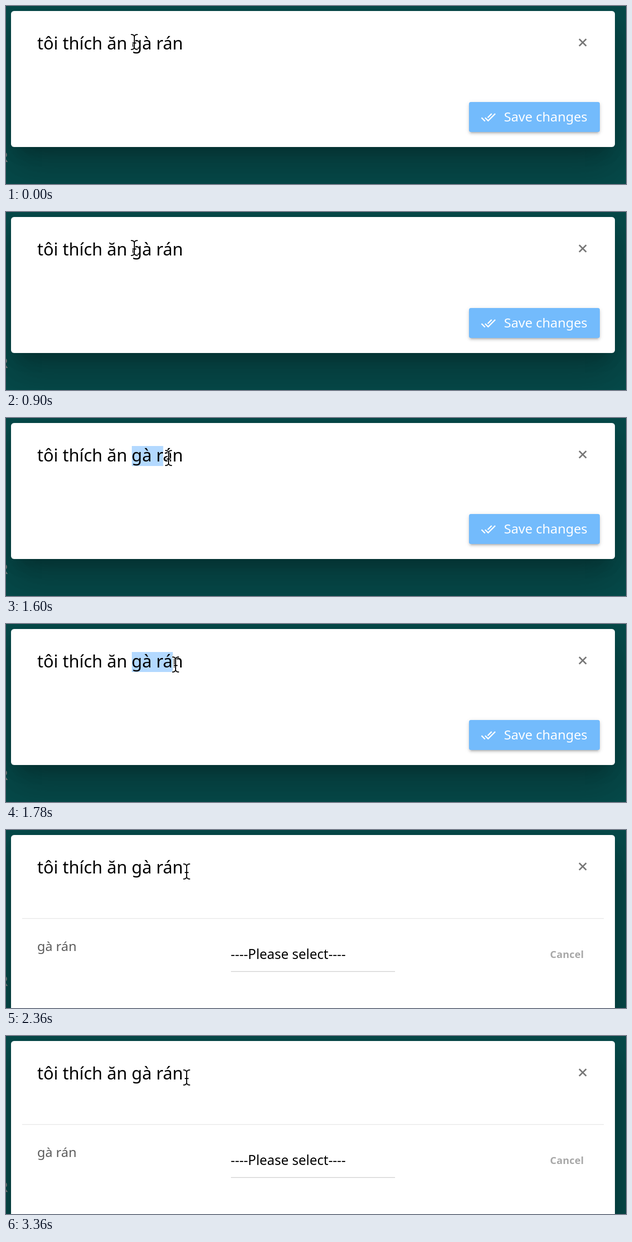
Animation of 1232 by 356 pixels, one loop 3380 ms. Source, as an HTML page:

```html
<!DOCTYPE html>
<html lang="vi">
<head>
<meta charset="utf-8">
<title>Select a phrase</title>
<style>
  html, body { margin: 0; width: 100%; height: 100%; overflow: hidden; background: #074b4b; }
  svg { position: absolute; left: 0; top: 0; display: block; }
  text { font-family: "Noto Sans", sans-serif; font-size: 26px; white-space: pre; }
  #card, #button { position: absolute; box-sizing: border-box; }
  #card {
    left: 10px; top: 10px; width: 1200px; height: 272px;
    border-radius: 6px; background: #fff;
    box-shadow: 0 22px 30px -14px rgba(0,0,0,.2), 0 48px 76px 6px rgba(0,0,0,.14), 0 18px 92px 16px rgba(0,0,0,.12);
  }
  #button {
    left: 910px; top: 182px; width: 260px; height: 60px;
    border-radius: 4px; background: #73bbfc;
    box-shadow: 0 6px 2px -4px rgba(0,0,0,.12), 0 4px 4px rgba(0,0,0,.1), 0 2px 10px rgba(0,0,0,.12);
  }
</style>
</head>
<body>
<svg width="1232" height="356">
  <text x="4" y="312" text-anchor="end" style="font-size:28px" fill="#7c8080">R</text>
</svg>
<div id="card"><div id="button"></div></div>
<svg width="1232" height="356" viewBox="0 0 1232 356">
  <rect id="mark" x="250" y="56" width="0" height="40" fill="#b3d9ff"/>
  <text x="62" y="87" style="font-size:34px">tôi thích ăn gà rán</text>
  <path d="M1139 66l14 14m0-14l-14 14" stroke="#777" stroke-width="3"/>

  <g id="save" fill="#fff">
    <path transform="translate(943.5 207.6) scale(1.25)" d="M18 7l-1.41-1.41-6.34 6.34 1.41 1.41L18 7zm4.24-1.41L11.66 16.17 7.48 12l-1.41 1.41L11.66 19l12-12-1.42-1.41zM.41 13.41L6 19l1.41-1.41L1.83 12 .41 13.41z"/>
    <text x="989.5" y="231">Save changes</text>
  </g>

  <g id="form">
    <path d="M32 177H1188" stroke="#eee" stroke-width="2"/>
    <text x="62" y="242" fill="#5c5c5c">gà rán</text>
    <text x="446.5" y="258" style="font-size:26.667px">----Please select----</text>
    <path d="M447 283H773" stroke="#ddd" stroke-width="2"/>
    <text x="1081" y="256" style="font-size:20px;font-weight:700;letter-spacing:.2px" fill="#a8a8a8">Cancel</text>
  </g>

  <g id="cursor" fill="none" stroke-linecap="round" stroke-linejoin="round">
    <path id="beam" stroke="#fff" stroke-width="4" d="M-6-15Q-1-15 0-11Q1-15 6-15M0-11V11M-6 15Q-1 15 0 11Q1 15 6 15M-3 2H3"/>
    <use href="#beam" id="ink"/>
  </g>
</svg>
<script>
  const LOOP = 3380, OPEN = 2350, START = 250;
  const path = [[960, 255, 72], [1260, 311, 79], [1600, 323, 80], [2060, 359, 83]];
  const stops = [START, 270.5, 289.6, 298.4, 312.4, 331.5, 352];
  const $ = id => document.getElementById(id);

  // Black core over the white halo of the pointer
  const ink = $("beam").cloneNode();
  ink.removeAttribute("id");
  ink.setAttribute("stroke", "#000");
  ink.setAttribute("stroke-width", 2);
  $("ink").replaceWith(ink);

  function pointer(t) {
    if (t <= path[0][0]) return path[0].slice(1);
    for (let i = 1; i < path.length; i++) {
      const [t0, x0, y0] = path[i - 1], [t1, x1, y1] = path[i];
      if (t < t1) {
        const k = (t - t0) / (t1 - t0);
        return [x0 + (x1 - x0) * k, y0 + (y1 - y0) * k];
      }
    }
    return path[path.length - 1].slice(1);
  }

  // Selection snaps to the character edge nearest the slightly lagging pointer
  function selectionEnd(x) {
    return stops.reduce((a, b) => Math.abs(b - x + 8) < Math.abs(a - x + 8) ? b : a);
  }

  function render(t) {
    const [x, y] = pointer(t), open = t >= OPEN;
    $("cursor").setAttribute("transform", `translate(${Math.round(x)} ${Math.round(y)})`);
    $("mark").setAttribute("width", open ? 0 : selectionEnd(x) - START);
    $("card").style.height = open ? "520px" : "272px";
    $("button").style.display = $("save").style.display = open ? "none" : "";
    $("form").style.display = open ? "" : "none";
  }

  const begin = performance.now();
  function tick() {
    render((performance.now() - begin) % LOOP);
    requestAnimationFrame(tick);
  }
  render(0);
  requestAnimationFrame(tick);
</script>
</body>
</html>
```
